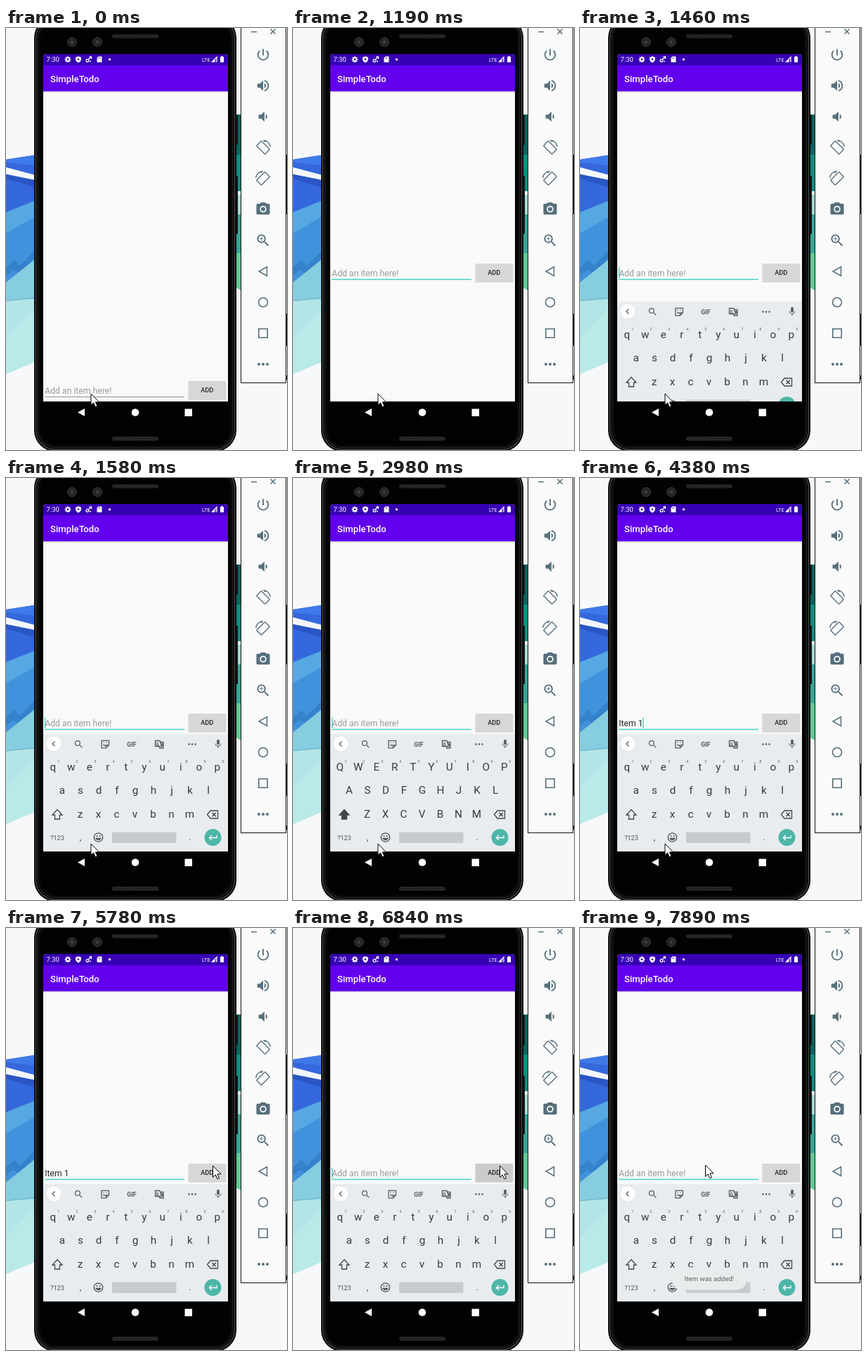
Animation, 400 px wide and 600 px high, one loop 8 s. Source, as an HTML page:

```html
<!DOCTYPE html>
<html lang="en">
<head>
<meta charset="utf-8">
<title>To-do app demo</title>
<style>
html, body { margin: 0; width: 100%; height: 100%; overflow: hidden; background: #f7f8f9; }
svg { display: block; width: 400px; height: 600px; font-family: Roboto, sans-serif; }
text { white-space: pre; }
.mid { text-anchor: middle; }
.line { fill: none; stroke-width: 1.3; }
</style>
</head>
<body>
<svg viewBox="0 0 400 600">
  <defs>
    <clipPath id="screenClip"><path d="M53 531V42q0-5 5-5H311q5 0 5 5V531z"/></clipPath>
    <pattern id="mesh" width="3" height="3" patternUnits="userSpaceOnUse">
      <path d="M0 0h3v3H0z" fill="#141414"/><path d="M0 0 3 3M3 0 0 3" stroke="#3c3c3c" stroke-width=".7"/>
    </pattern>
  </defs>

  <!-- wallpaper -->
  <path d="M0 187 45 180V270H0z" fill="#3568dc"/>
  <path d="M0 187 45 180V196L0 191z" fill="#3f7ae8"/>
  <path d="M0 198 45 210V217L0 208z" fill="#f3f7fc"/>
  <path d="M0 208 45 217V228L0 214z" fill="#2a55c4"/>
  <path d="M0 262 45 244V365H0z" fill="#4192dc"/>
  <path d="M0 262 45 244V266L0 292z" fill="#55a8e2"/>
  <path d="M0 340 12 330 20 338 45 312V322L20 350 10 344 0 352z" fill="#3482cc"/>
  <path d="M0 362 45 326V473L0 492z" fill="#b3e5e7"/>
  <path d="M0 362 45 326V385L0 388z" fill="#86cde0"/>
  <path d="M0 388 45 383" stroke="#5a9fb0" stroke-width=".6"/>
  <path d="M45 395 0 440V492L45 473z" fill="#b9e9e9"/>
  <path d="M326 123h8v57h-8z" fill="#07655f"/>
  <path d="M326 180h8v52h-8z" fill="#0b8f80"/>
  <path d="M326 237h8v28h-8z" fill="#9fd8d6"/>
  <path d="M326 265h8v55h-8z" fill="#35a596"/>
  <path d="M326 320h8v53l-8-5z" fill="#5fca94"/>
  <path d="M399 180h1v85h-1zM399 406h1v46h-1zM399 494h1v6h-1z" fill="#222"/>

  <!-- phone -->
  <path d="M326 124h4v42h-4zM326 210h4v83h-4z" fill="#161616"/>
  <rect x="40" y="-16" width="288" height="618" rx="30" fill="#080808"/>
  <rect x="42.5" y="-13.5" width="283" height="613" rx="28" class="line" stroke="#484848"/>
  <rect x="45.5" y="-10.5" width="277" height="607" rx="25" class="line" stroke="#202020"/>
  <rect x="49" y="-7" width="270" height="600" rx="22" fill="#020202"/>
  <rect x="151" y="9" width="66" height="5.5" rx="2.7" fill="url(#mesh)"/>
  <rect x="151" y="581" width="66" height="6" rx="3" fill="url(#mesh)"/>
  <g fill="#252525" stroke="#343434"><circle cx="94" cy="20" r="6.5"/><circle cx="130" cy="20" r="6.5"/></g>
  <g fill="#4b3b37"><circle cx="94" cy="20" r="2.2"/><circle cx="130" cy="20" r="2.2"/></g>

  <g clip-path="url(#screenClip)">
    <path d="M53 37h263v494H53z" fill="#f9f9f9"/>
    <path d="M53 37h263v16H53z" fill="#3700b3"/>
    <path d="M53 90h263v1.5H53z" fill="#d3cfdc"/>
    <path d="M53 53h263v37H53z" fill="#6200ee"/>
    <g fill="#fff">
      <text x="57.5" y="48.3" font-size="9.6">7:30</text>
      <g id="statusIcons"></g>
      <circle cx="147.5" cy="44.7" r="1.6"/>
      <text x="279" y="47.8" font-size="7.4">LTE</text>
      <path d="M292 48.5 300.5 40v8.500z" fill-opacity=".35"/>
      <path d="M292 48.500 297 43.500V48.500zM292 48.500 300.500 40V48.500H299.500V42.500L293.500 48.500z"/>
      <path d="M305 41h1.300v-1h2.400v1H310v7.800h-5z"/>
      <text x="63" y="76.800" font-size="13.200" font-weight="500">SimpleTodo</text>
    </g>

    <g id="row">
      <path id="rule" d="M55 524.500H254"/>
      <text id="entry" x="55.300" y="519.800" font-size="12.200"></text>
      <path id="caret" d="M0 507.500v15" stroke="#27c9b7" stroke-width="1.200"/>
      <rect x="259.500" y="503" width="54" height="26" rx="1.500" fill="#000" opacity=".12"/>
      <rect id="button" x="259.500" y="502" width="53.500" height="26" rx="1.500"/>
      <text class="mid" x="286.200" y="518.300" font-size="9.200" font-weight="500" fill="#222">ADD</text>
    </g>

    <g id="keyboard">
      <path d="M53 364h263v168H53z" fill="#e8ecef"/>
      <circle cx="68" cy="378.500" r="10.500" fill="#ccd0d3"/>
      <circle cx="68" cy="378" r="10.500" fill="#fff"/>
      <path id="chevron" class="line" stroke="#555b60"/>
      <g id="tools"></g>
      <g id="hints" font-size="10.800" fill="#4a4f54"></g>
      <g id="keys" font-size="15.300" fill="#363b3f"></g>
      <g id="digits" font-size="5.800" fill="#5f656a"></g>
      <path id="shift" class="line" stroke="#3f454a" d="M73 471.500 80 479H76.500V485H69.500V479H66z"/>
      <path class="line" stroke="#3f454a" d="M286.500 478.500 291 473H301.500V484H291zM293.500 475.800l5.400 5.400m0-5.400-5.400 5.400"/>
      <text class="mid" x="73" y="514.500" font-size="9" fill="#4a4f54">?123</text>
      <text class="mid" x="106" y="515" font-size="13" fill="#4a4f54">,</text>
      <text class="mid" x="262" y="515" font-size="13" fill="#4a4f54">.</text>
      <g class="line" stroke="#4a4f54"><circle cx="131.500" cy="511" r="6.200"/><path d="M128.300 512.500q3.200 4 6.400 0z"/></g>
      <path d="M128.700 508.200h1.700v1.700h-1.700zM132.700 508.200h1.700v1.700h-1.700z" fill="#4a4f54"/>
      <rect x="151" y="503.500" width="91.500" height="15.500" rx="1.500" fill="#c7cbce"/>
      <circle cx="294.500" cy="511" r="12" fill="#4db6a8"/>
      <path d="M300 508v3.500H289.500M292.800 508l-3.500 3.500 3.500 3.500" class="line" stroke="#fff"/>
    </g>

    <g id="toast">
      <rect x="131" y="482.500" width="106" height="32" rx="14" fill="#e9eced"/>
      <text class="mid" x="184" y="501.500" font-size="9.600" fill="#5e6163">Item was added!</text>
    </g>
  </g>

  <g fill="#fff">
    <path d="M102 546.500 112 541V552z"/>
    <circle cx="184" cy="546.500" r="5.300"/>
    <path d="M254.500 541.500h10.500v10.500h-10.500z"/>
  </g>

  <!-- emulator controls -->
  <rect x="334.500" y="-2" width="64" height="506.500" fill="#fafafa" stroke="#111"/>
  <g id="panel" fill="#566f7c"></g>
  <g class="line" stroke="#566f7c">
    <path d="M349 5.500h8M376.500 1.500l7 7m0-7-7 7M371.500 339.500V352.500L360 346z" stroke-width="1.500"/>
    <circle cx="366" cy="390" r="6.500" stroke-width="1.600"/>
    <path d="M359.800 427.800h12.400v12.400h-12.400z" stroke-width="1.600"/>
  </g>

  <path id="mouse" d="M0 0V16.300L3.700 12.900 6.300 18.800 9 17.600 6.400 11.900H11.500z" fill="#fff" stroke="#000"/>
</svg>

<script>
const $ = id => document.getElementById(id);
const icon = (x, y, size, d, extra = '') =>
  `<path transform="translate(${x} ${y}) scale(${size / 24}) ${extra} translate(-12 -12)" d="${d}"/>`;
const dots = (x, y, r, gap) =>
  [-1, 0, 1].map(i => `<circle cx="${x + i * gap}" cy="${y}" r="${r}"/>`).join('');
const label = (x, y, s) => `<text class="mid" x="${x}" y="${y}">${s}</text>`;

const lens = 'M15.5 14h-.79l-.28-.27A6.47 6.47 0 0 0 16 9.5 6.5 6.5 0 1 0 9.5 16c1.61 0 3.09-.59 4.23-1.57l.27.28v.79l5 4.99L20.49 19zM9.5 14a4.500 4.500 0 1 1 0-9 4.500 4.500 0 0 1 0 9z';
const rotate = 'M16.48 2.52c3.27 1.55 5.61 4.72 5.97 8.48h1.5C23.44 4.84 18.29 0 12 0l-.66.03 3.81 3.81zM10.23 1.75c-.59-.59-1.54-.59-2.12 0L1.75 8.11c-.59.59-.59 1.54 0 2.12l12.02 12.02c.59.59 1.54.59 2.12 0l6.36-6.36c.59-.59.59-1.54 0-2.12zM14.83 21.19 2.81 9.17l6.36-6.36 12.02 12.02z';

$('panel').innerHTML =
  icon(366, 38, 22, 'M13 3h-2v10h2zM17.83 5.17l-1.42 1.42A6.92 6.92 0 0 1 19 12a7 7 0 1 1-11.42-5.42L6.17 5.17A8.93 8.93 0 0 0 3 12a9 9 0 0 0 18 0c0-2.74-1.23-5.18-3.17-6.83z') +
  icon(366, 82, 22, 'M3 9v6h4l5 5V4L7 9zM16.5 12A4.5 4.5 0 0 0 14 7.97v8.05A4.47 4.47 0 0 0 16.5 12zM14 3.23v2.06a7 7 0 0 1 0 13.42v2.06a9 9 0 0 0 0-17.54z') +
  icon(366, 126, 22, 'M18.5 12A4.5 4.5 0 0 0 16 7.97v8.05A4.47 4.47 0 0 0 18.5 12zM5 9v6h4l5 5V4L9 9z') +
  icon(366, 170, 22, rotate) +
  icon(366, 214, 22, rotate, 'scale(-1 1)') +
  icon(366, 257.5, 23, 'M9 2 7.17 4H4a2 2 0 0 0-2 2v12a2 2 0 0 0 2 2h16a2 2 0 0 0 2-2V6a2 2 0 0 0-2-2h-3.17L15 2zM12 17a5 5 0 1 1 0-10 5 5 0 0 1 0 10zM12 15.2a3.2 3.2 0 1 0 0-6.400 3.200 3.200 0 0 0 0 6.400z') +
  icon(366, 302, 23, lens + 'M12.500 10h-2.500v2.500H9V10H6.500V9H9V6.500h1V9h2.500z') +
  dots(366, 478, 2, 6);

const teeth = [0, 45, 90, 135].map(a => `<path d="M87.2 40.3h1.600v8.800h-1.600z" transform="rotate(${a} 88 44.700)"/>`).join('');
$('statusIcons').innerHTML = teeth +
  '<circle cx="88" cy="44.700" r="3.200"/><circle cx="88" cy="44.700" r="1.400" fill="#3700b3"/>' +
  '<path d="M103 40.200 107 41.700V44.500Q106.500 48 103 49.400 99.500 48 99 44.500V41.700z"/><circle cx="103" cy="44.500" r="1.300" fill="#3700b3"/>' +
  '<g fill="none" stroke="#fff" stroke-width="1.300"><circle cx="116" cy="46.300" r="1.900"/><path d="M117.500 44.500 121.500 41M118.500 41h3v3M119 47.500h2"/></g>' +
  '<path d="M131.500 40.500H136.500V48.800H129.500V42.500z"/><path d="M131.500 42h.8v1.700h-.8zM133.200 42h.8v1.700h-.8z" fill="#3700b3"/>';

$('tools').innerHTML = '<g fill="#555b60">' +
  icon(103.500, 378.500, 15, lens) +
  '<text class="mid" x="179" y="381.600" font-size="8.800" font-weight="700">GIF</text>' +
  dots(265, 378.500, 1.300, 4.500) +
  '<text class="mid" x="215.500" y="380.500" font-size="6.500" font-weight="700">G</text></g>' +
  '<g class="line" stroke="#555b60"><path d="M136 373.300h10.500v6.500l-4 4H136zM146.500 379.800h-4v4M138.500 379q2 2.500 4 .5M138.500 376h1m3 0h1"/>' +
  '<path d="M212.500 373.500h6.500l2.500 8h-9zM220 375.500h4v8.500h-5l-1-2.500M220.500 378h3.500m-2 0 1.500 4"/></g>';
$('keyboard').insertAdjacentHTML('beforeend', '<g fill="#555b60">' +
  icon(302, 378, 15, 'M12 14a3 3 0 0 0 3-3V5a3 3 0 0 0-6 0v6a3 3 0 0 0 3 3zM17.3 11a5.300 5.300 0 0 1-10.600 0H5c0 3.410 2.720 6.230 6 6.720V21h2v-3.280c3.280-.480 6-3.300 6-6.720z') + '</g>');

const rows = [['qwertyuiop', 66.8, 415.5], ['asdfghjkl', 80, 449], ['zxcvbnm', 105.5, 482.7]];
$('keys').innerHTML = rows.map(([s, x, y]) =>
  [...s].map((c, i) => label(x + 26 * i, y, c)).join('')).join('');
$('digits').innerHTML = [...'1234567890'].map((c, i) => label(75 + 26 * i, 404.500, c)).join('');

// Last value whose start time has passed
const hold = (t, steps) => steps.reduce((v, s) => t >= s[0] ? s[1] : v, steps[0][1]);

const mousePath = [[0, [121, 520]], [4760, [150, 489]], [4880, [202, 422]], [5000, [256, 350]],
  [5120, [290, 313]], [5270, [293.500, 328]], [5390, [294.500, 338]], [6970, [283, 338]],
  [7110, [216, 337.500]], [7270, [190, 337]], [7390, [178.500, 337]]];
const typed = [[0, ''], [3370, 'I'], [3860, 'It'], [3980, 'Ite'], [4110, 'Item'],
  [4260, 'Item '], [4380, 'Item 1'], [6720, '']];
const suggestions = [[0, ''], [3490, "I,I'm,It"], [3860, "It,It's,Its"], [3980, 'Ite,Item,Items'],
  [4110, 'Item,Items,Its'], [4380, '']];
const caretOn = [[0, 0], [440, 1], [940, 0], [1460, 1], [1950, 0], [2320, 1], [4880, 0],
  [5390, 1], [5780, 0], [6720, 1], [7270, 0]];
const slide = [[0, 170], [1340, 95], [1460, 25], [1580, 0]];
const buttonFill = [[0, '#d6d7d7'], [6440, '#c3c4c4'], [6720, '#cacbcb'], [6970, '#d0d1d1'], [7270, '#d6d7d7']];
const toastAlpha = [[0, 0], [7640, .3], [7770, .65], [7890, 1]];

function draw(t) {
  const set = (id, attrs) => Object.entries(attrs).forEach(([k, v]) => $(id).setAttribute(k, v));
  const focused = t >= 190, text = hold(t, typed), entry = $('entry');
  set('row', { transform: `translate(0 ${t < 1190 ? 0 : -167})` });
  set('rule', { stroke: focused ? '#45d3c3' : '#8f8f8f', 'stroke-width': focused ? 1.6 : 1 });
  entry.textContent = text || 'Add an item here!';
  set('entry', {
    fill: text ? '#2a2a2a' : '#9a9a9a',
    'text-decoration': t >= 3370 && t < 4260 ? 'underline' : 'none'
  });
  const end = text ? entry.getComputedTextLength() : 0;
  set('caret', { transform: `translate(${55.700 + end} 0)`, opacity: hold(t, caretOn) });
  set('button', { fill: hold(t, buttonFill) });

  set('keyboard', { transform: `translate(0 ${hold(t, slide)})` });
  const caps = t >= 2980 && t < 3120;
  for (const key of $('keys').children)
    key.textContent = caps ? key.textContent.toUpperCase() : key.textContent.toLowerCase();
  $('shift').style.fill = caps ? '#3f454a' : 'none';
  const words = hold(t, suggestions);
  set('tools', { opacity: words ? 0 : 1 });
  set('chevron', { d: words ? 'M66.500 374.500 70 378 66.500 381.500' : 'M69.500 374.500 66 378 69.500 381.500' });
  $('hints').innerHTML = words && words.split(',').map((w, i) => label(106 + 73 * i, 382, w)).join('');

  set('toast', { opacity: hold(t, toastAlpha) });
  set('mouse', { transform: `translate(${hold(t, mousePath)})` });
}

const start = performance.now();
function tick() {
  draw((performance.now() - start) % 8000);
  requestAnimationFrame(tick);
}
tick();
</script>
</body>
</html>
```
